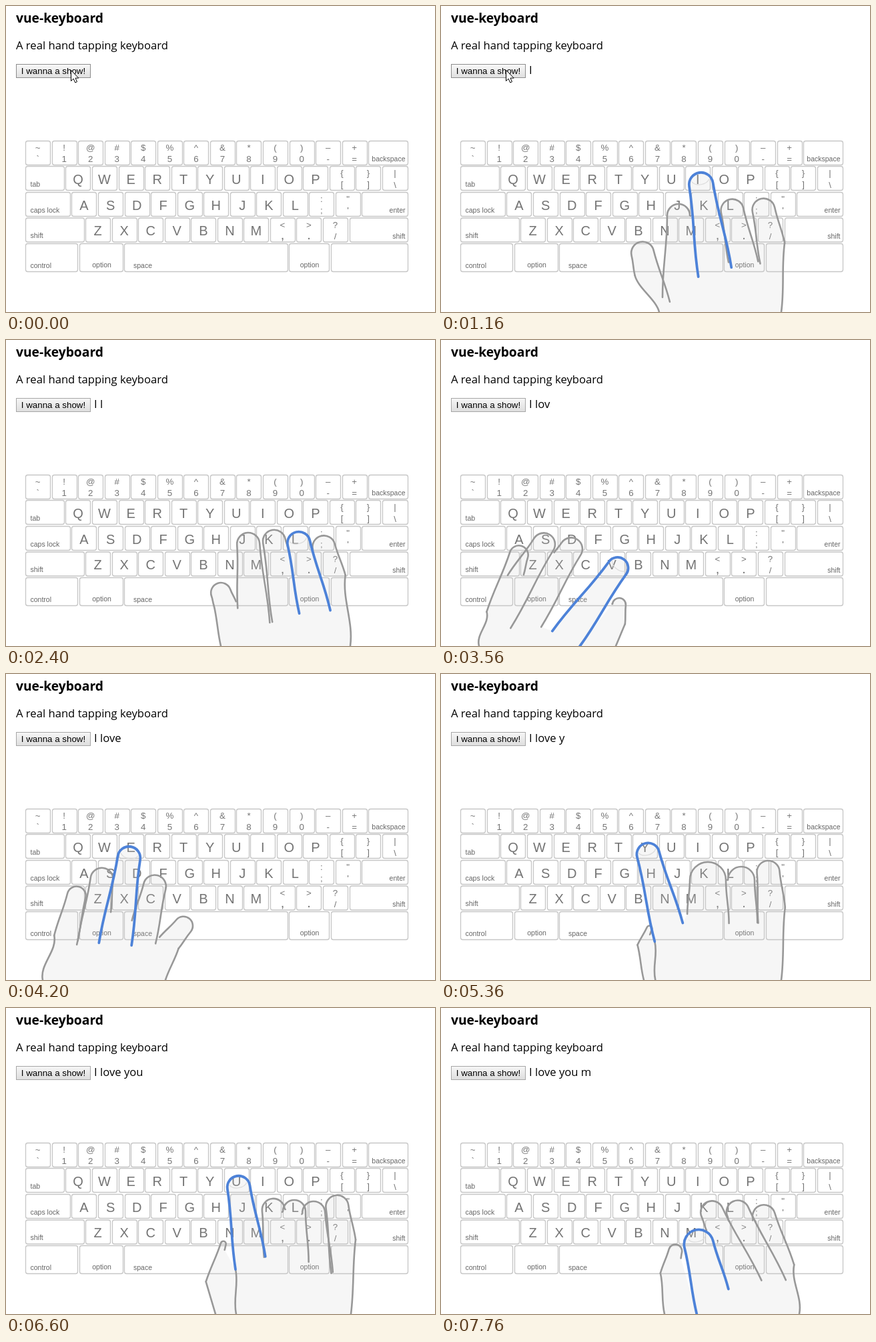
Write an HTML page with a canvas that moves like this. It is 643 by 459 pixels and loops after 8 s.

```html
<!DOCTYPE html>
<html lang="en">
<head>
<meta charset="utf-8">
<title>vue-keyboard</title>
<style>
  html, body { margin: 0; width: 100%; height: 100%; overflow: hidden; background: #fff; }
  #stage { position: absolute; left: 0; top: 0; width: 643px; height: 459px; overflow: hidden; }
  #stage > * { position: absolute; margin: 0; white-space: pre; }
  h1, p { left: 15px; color: #000; font: 16.65px/24px "Open Sans", "Noto Sans", sans-serif; }
  h1 { top: 6px; font-weight: 700; font-size: 19.25px; }
  #intro { top: 47px; }
  #typed { left: 132px; top: 84px; }
  #show {
    left: 15px; top: 87px; width: 112px; height: 21px; box-sizing: border-box;
    border: 1px solid #a6a6a6; text-align: center; color: #000;
    background: linear-gradient(#f6f6f6, #dedede);
    font: 13.333px/19px "Liberation Sans", Arial, sans-serif;
  }
  #show.hover { border-color: #8c8c8c; background: linear-gradient(#f8f8f8, #e0e0e0); }
  canvas { left: 0; top: 0; }
</style>
</head>
<body>
<div id="stage">
  <h1>vue-keyboard</h1>
  <p id="intro">A real hand tapping keyboard</p>
  <div id="show">I wanna a show!</div>
  <p id="typed"></p>
  <canvas id="board" width="643" height="459"></canvas>
</div>
<script>
const LOOP = 8000;
const FLOOR = 459;
const PITCH = 39.55;
const MESSAGE = 'I love you m';
const TAPS = [1160, 1720, 2400, 3040, 3560, 4200, 4800, 5360, 5960, 6600, 7160, 7760];

const show = document.getElementById('show');
const typed = document.getElementById('typed');
const ctx = document.getElementById('board').getContext('2d');

// Finger: tip x, tip y, tilt in degrees, left length, right length, radius.
// Wrist: where the hand meets the bottom edge. A space is tapped without a hand.
const POSES = {
  I: { wrist: [327, 510], active: 2, fingers: [
    [298, 354, -14, 47, 98], [356, 297, 0, 140, 18], [387, 250, -9, 154, 148, 18],
    [433, 290, -12, 92, 100], [480, 289, -12, 95, 72]] },
  L: { wrist: [322, 516], active: 3, fingers: [
    [317, 365, -20, 30, 35, 15], [362, 289, -4, 112, 137], [399, 285, -10, 136, 30],
    [435, 288, -13, 120, 126], [472, 294, -15, 18, 66]] },
  O: { wrist: [322, 506], active: 3, fingers: [
    [300, 360, -16, 45, 80], [355, 301, -3, 122, 80], [390, 279, -9, 116, 32],
    [424, 251, -9, 152, 150], [471, 293, -12, 90, 76]] },
  V: { wrist: [57, 262], active: 3, fingers: [
    [121, 309, 18, 110, 40, 14], [163, 292, 32, 85, 150], [204, 299, 32, 35, 140],
    [274, 329, 36, 150, 145, 16], [268, 387, 6, 10, 38, 10]] },
  E: { wrist: [55, 239], active: 2, fingers: [
    [109, 319, 14, 80, 85, 14], [146, 291, 8, 113, 64], [187, 259, 9, 150, 146],
    [227, 302, 14, 75, 100], [275, 367, 40, 50, 45, 14]] },
  Y: { wrist: [304, 510], active: 1, fold: true, fingers: [
    [314, 378, 25, 34, 12, 4], [306, 254, -15, 146, 130], [400, 282, 0, 78, 92, 27],
    [450, 289, 0, 20, 84, 20], [489, 280, -5, 92, 72]] },
  U: { wrist: [314, 517], active: 1, fold: true, fingers: [
    [327, 350, 18, 66, 12, 4], [346, 252, -9, 138, 126], [399, 286, -6, 86, 18],
    [432, 288, 0, 18, 93], [460, 290, -4, 18, 108], [494, 281, -8, 115, 70]] },
  M: { wrist: [335, 537], active: 1, fingers: [
    [354, 355, 16, 48, 18, 10], [381, 333, -14, 125, 98, 22], [399, 291, -25, 38, 141],
    [438, 290, -24, 24, 140], [479, 296, -17, 18, 100]] }
};

// A curve is a start point followed by groups of three bezier points.
function fingerCurve([x, y, tilt, left, right, r = 17]) {
  const sin = Math.sin(tilt * Math.PI / 180), cos = Math.cos(tilt * Math.PI / 180);
  const at = (down, side) => [x - sin * down + cos * side, y + cos * down + sin * side];
  const half = (len, s) => {
    const foot = s * (r + len * 0.05), bend = Math.max(0, len - r) * 0.4;
    return [at(len, foot), at(len - bend, foot), at(r + bend, s * r), at(r, s * r),
      at(r * 0.45, s * r), at(0, s * r * 0.55)];
  };
  return [...half(left, -1), at(0, 0), ...half(right, 1).reverse()];
}

function wristCurve([x, y], end, side) {
  const h = FLOOR - y, bow = side * 5;
  return [[x, y], [x - bow, y + h * 0.35], [end + bow, y + h * 0.65], [end, FLOOR]];
}

function nailCurve([x, y, tilt]) {
  const a = tilt * Math.PI / 180;
  const at = (down, side) =>
    [x - Math.sin(a) * down + Math.cos(a) * side, y + Math.cos(a) * down + Math.sin(a) * side];
  return [at(12, -13), at(20, -8), at(20, 8), at(12, 13)];
}

function buildHand({ wrist, active, fold, fingers }) {
  const curves = fingers.map(fingerCurve);
  const first = curves[0][0], last = curves.at(-1).at(-1);
  const leftSide = wristCurve(first, wrist[0], -1).reverse();
  const rightSide = wristCurve(last, wrist[1], 1);
  const grey = [leftSide, ...curves.filter((c, i) => i !== active), rightSide];
  if (fold) {
    const foot = curves[active][0];
    grey.push(wristCurve(foot, foot[0] + 1, -1));
  }
  return {
    outline: [leftSide, ...curves, rightSide],
    grey, blue: [curves[active]], nail: [nailCurve(fingers[active])]
  };
}

const hands = {};
for (const key in POSES) hands[key] = buildHand(POSES[key]);

function addCurve(p) {
  for (let i = 1; i < p.length; i += 3) ctx.bezierCurveTo(...p[i], ...p[i + 1], ...p[i + 2]);
}

function strokeCurves(curves, color, width) {
  ctx.strokeStyle = color;
  ctx.lineWidth = width;
  for (const c of curves) {
    ctx.beginPath();
    ctx.moveTo(...c[0]);
    addCurve(c);
    ctx.stroke();
  }
}

function drawHand(hand) {
  ctx.lineCap = ctx.lineJoin = 'round';
  ctx.beginPath();
  for (const c of hand.outline) {
    ctx.lineTo(...c[0]);
    addCurve(c);
  }
  ctx.fillStyle = 'rgba(205,205,205,0.18)';
  ctx.fill();
  strokeCurves(hand.nail, '#dcdcdc', 1.2);
  strokeCurves(hand.grey, '#989898', 2.6);
  strokeCurves(hand.blue, '#4d82d8', 3.8);
}

function keyBox(x, right, y, h = 36) {
  ctx.beginPath();
  ctx.roundRect(x + 0.5, y + 0.5, right - x - 1, h, 3);
  ctx.stroke();
}

function label(text, x, y, size, align = 'center') {
  ctx.font = size + 'px "Liberation Sans", Arial, sans-serif';
  ctx.textAlign = align;
  ctx.fillStyle = size < 12 ? '#666' : '#747474';
  ctx.fillText(text, x, y);
}

// One row: wide left key, letters, two-sign keys, wide right key
function drawRow(y, start, letters, upper, lower, leftName, rightName) {
  const count = letters.length + upper.length;
  const edge = i => Math.round(start + i * PITCH);
  if (leftName) {
    keyBox(29, edge(0) - 1, y);
    label(leftName, 36.5, y + 30.5, 10.5, 'left');
  }
  for (let i = 0; i < count; i++) {
    const x = start + i * PITCH + 18.6, n = i - letters.length;
    keyBox(edge(i), edge(i) + 38, y);
    if (n < 0) {
      label(letters[i], x, y + 26.7, 20);
    } else {
      label(upper[n], x, y + 15, 13.3);
      label(lower[n], x, y + 32, ',.'.includes(lower[n]) ? 20 : 13.3);
    }
  }
  keyBox(edge(count), 603, y);
  label(rightName, 598.5, y + 31, 10.5, 'right');
}

function drawKeyboard() {
  ctx.strokeStyle = '#c6c6c6';
  ctx.lineWidth = 1.3;
  drawRow(202, 29, '', '~!@#$%^&*()–+', '`1234567890-=', '', 'backspace');
  drawRow(240, 89.4, 'QWERTYUIOP', '{}', '[]', 'tab', '');
  label('|', 583, 255, 13.3);
  label('\\', 583, 273, 13.3);
  drawRow(279, 98.4, 'ASDFGHJKL', ':"', ";'", 'caps lock', 'enter');
  drawRow(317.5, 119, 'ZXCVBNM', '<>?', ',./', 'shift', 'shift');
  [[29, 108], [110, 176], [177, 423], [424, 485], [487, 603]]
    .forEach(([a, b]) => keyBox(a, b, 356, 42));
  label('control', 36.5, 393, 10.5, 'left');
  label('option', 143.5, 392, 10.5);
  label('space', 191, 393, 10.5, 'left');
  label('option', 455, 392, 10.5);
}

function drawPointer([x, y]) {
  ctx.save();
  ctx.translate(x + 0.5, y + 0.5);
  ctx.beginPath();
  [[0, 0], [0, 16], [3.6, 12.6], [6.2, 18.4], [9, 17.2], [6.5, 11.6], [11.3, 11.6]]
    .forEach(p => ctx.lineTo(...p));
  ctx.closePath();
  ctx.fillStyle = '#fff';
  ctx.fill();
  ctx.strokeStyle = '#000';
  ctx.lineWidth = 1;
  ctx.lineJoin = 'miter';
  ctx.stroke();
  ctx.restore();
}

// The pointer rests on the button, then leaves through the bottom in steps.
function pointerAt(t) {
  if (t < 1720) return [97, 96];
  if (t >= 2080) return null;
  const step = Math.floor((t - 1720) / 72);
  return [97 + step * 9, 96 + (step + 1) * 14 + step * step * 16];
}

function frame() {
  const t = performance.now() % LOOP;
  const text = MESSAGE.slice(0, TAPS.filter(at => t >= at).length);
  const hand = hands[text.slice(-1).toUpperCase()];
  const pointer = pointerAt(t);

  typed.textContent = text;
  show.style.top = (t >= 920 && t < 1160 ? 84 : 87) + 'px';
  show.className = t < 1720 ? 'hover' : '';

  ctx.clearRect(0, 0, 643, FLOOR);
  drawKeyboard();
  if (hand) drawHand(hand);
  if (pointer) drawPointer(pointer);
  requestAnimationFrame(frame);
}
frame();
</script>
</body>
</html>
```
